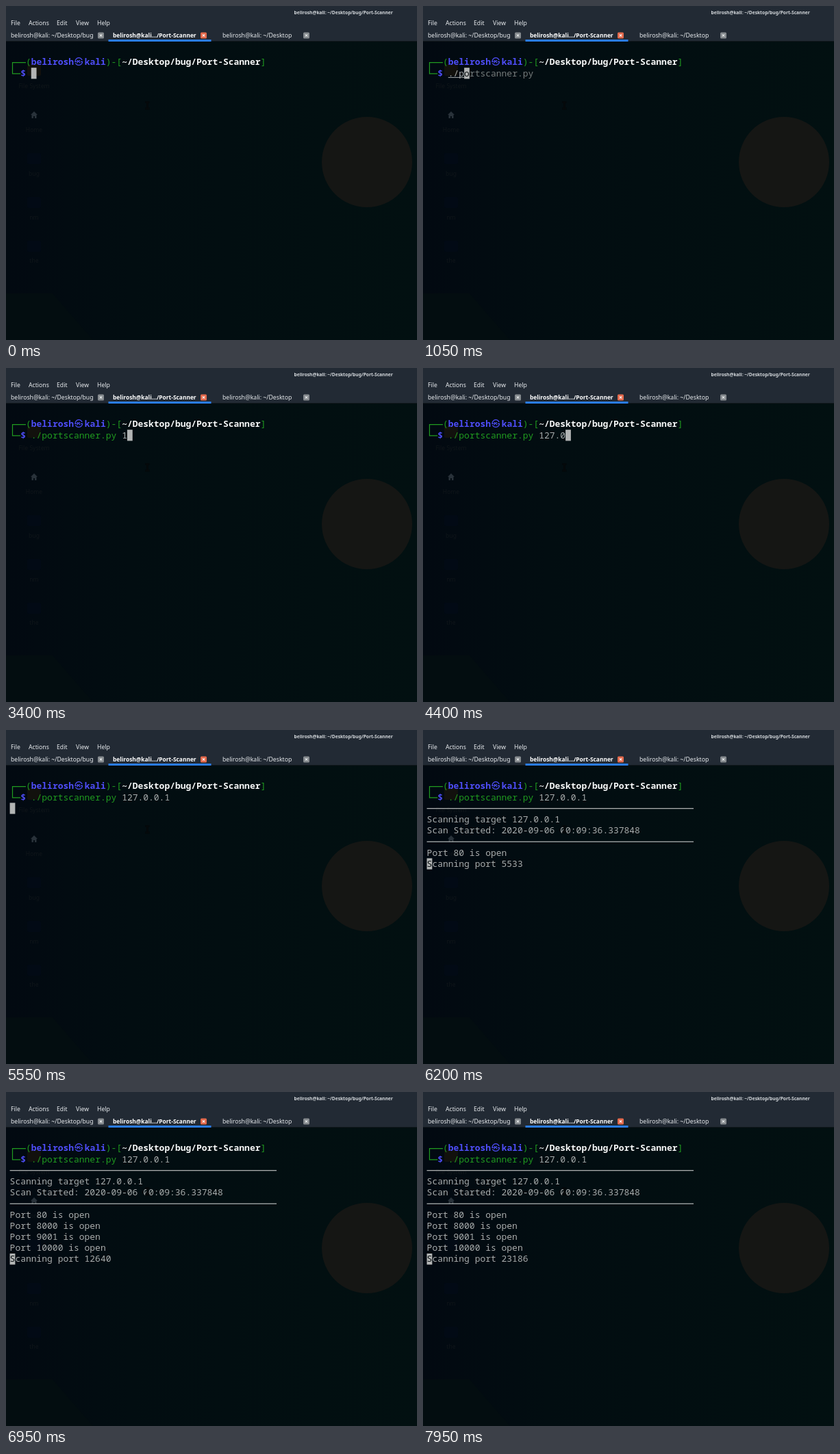
Recreate the animation shown at these times as an HTML page. Size 600 px wide and 488 px high, loop 8 s.

```html
<!DOCTYPE html>
<html lang="en">
<head>
<meta charset="utf-8">
<title>Terminal port scan</title>
<style>
  html, body { margin: 0; width: 100%; height: 100%; overflow: hidden; background: #020d10; }
  svg { display: block; width: 100vw; height: 100vh; }
  text { white-space: pre; }
  .ui { font: 8.7px "Noto Sans", "Open Sans", sans-serif; fill: #e8ebee; }
  .strong { font-weight: 700; }
  .ghost { font: 8.6px "Noto Sans", sans-serif; fill: #10161a; text-anchor: middle; }
  .mono { font: 12.98px "Noto Sans Mono", "DejaVu Sans Mono", monospace; font-variant-ligatures: none; }
  .bold { font-weight: 700; }
</style>
</head>
<body>
<svg viewBox="0 0 600 488" xmlns="http://www.w3.org/2000/svg">
  <defs>
    <linearGradient id="bg">
      <stop offset="0" stop-color="#020911"/>
      <stop offset=".3" stop-color="#020d11"/>
      <stop offset="1" stop-color="#021011"/>
    </linearGradient>
  </defs>
  <rect width="600" height="488" fill="url(#bg)"/>
  <path d="M0 420H68L127 488H0Z" fill="#030d10"/>
  <circle cx="527" cy="228" r="66" fill="#151614"/>
  <g id="desktop">
    <rect x="31" y="85" width="20" height="17" rx="2" fill="#12110d"/>
    <path d="M36 159l5-5 5 5h-1.500v5h-2.500v-3h-2v3h-2.500v-5z" fill="#29323a"/>
  </g>
  <g id="chrome">
    <rect width="600" height="51" fill="#222a34"/>
    <rect y="51" width="600" height="1" fill="#11171c"/>
    <rect x="149.500" y="49" width="150" height="3" fill="#2a7ce8"/>
  </g>
  <g id="screen"></g>
  <g id="pointer" fill="none" stroke-linecap="square">
    <path id="beam" d="M204.500 140.500h1l.8 .8 .8-.8h1M206.300 141.300v8M204.500 150h1l.8-.8 .8 .8h1" stroke="#05090b" stroke-width="2.400"/>
    <use href="#beam" style="stroke:#d0d3d4;stroke-width:1"/>
  </g>
</svg>
<script>
const NS = 'http://www.w3.org/2000/svg';
const $ = id => document.getElementById(id);
const LEFT = 5.6, TOP = 74, CW = 7.788, RH = 16.2;
const GREEN = '#209c20', BLUE = '#4f4efa', WHITE = '#f8f9f9', GREY = '#a9acac', DIM = '#777c7c';
const LOOP = 8000;
const USER = 'belirosh', HOST = USER + '@kali';

function add(parent, tag, attrs, text = '') {
  const el = document.createElementNS(NS, tag);
  for (const key in attrs) el.setAttribute(key, attrs[key]);
  el.textContent = text;
  parent.append(el);
  return el;
}

const colX = col => LEFT + col * CW;
const rowY = row => TOP + row * RH;
const screen = $('screen'), chrome = $('chrome'), desktop = $('desktop');

function write(col, row, text, fill = GREY, bold = false) {
  return add(screen, 'text', {
    x: colX(col), y: rowY(row) + 12.3, class: bold ? 'mono bold' : 'mono', style: `fill:${fill}`
  }, text);
}

// Window title, menu and tabs
function label(x, y, text, cls = '', style = '') {
  add(chrome, 'text', { x, y, class: 'ui ' + cls, style }, text);
}

function closeButton(x, fill, cross) {
  add(chrome, 'rect', { x, y: 38.5, width: 9, height: 9, rx: 1.5, fill });
  add(chrome, 'path', { d: `M${x + 2.8} 41.300l3.400 3.400m0-3.400l-3.400 3.400`, stroke: cross, 'stroke-width': 1.1 });
}

label(492.7, 11.5, HOST + ': ~/Desktop/bug/Port-Scanner', 'strong', 'font-size:6.67px;text-anchor:middle;fill:#d4d8dc');
[[7, 'File'], [33, 'Actions'], [74, 'Edit'], [102, 'View'], [133, 'Help']]
  .forEach(([x, name]) => label(x, 28, name));
label(7, 46, HOST + ': ~/Desktop/bug');
label(156, 46, HOST + '…/Port-Scanner', 'strong', 'font-size:8.4px;fill:#fff');
label(316, 46, HOST + ': ~/Desktop');
closeButton(134, '#858a8e', '#e8eaeb');
closeButton(284, '#e2694c', '#fff');
closeButton(434, '#858a8e', '#e8eaeb');

// Desktop icons showing faintly through the window
for (const y of [215, 279, 343]) add(desktop, 'rect', { x: 31, y, width: 20, height: 16, rx: 2, fill: '#020a15' });
[[120, 'File System'], [184, 'Home'], [248, 'bug'], [312, 'nm'], [375, 'the']]
  .forEach(([y, name]) => add(desktop, 'text', { x: 41, y, class: 'ghost' }, name));

// Prompt
add(screen, 'path', {
  d: `M${colX(3)} 82.700H${colX(.5)}V98.900H${colX(2)}`, fill: 'none', stroke: GREEN, 'stroke-width': 1.2
});
write(3, 0, '(', GREEN);
write(4, 0, USER, BLUE, true);
add(screen, 'text', {
  x: colX(13) - .5, y: rowY(0) + 12.3, 'text-anchor': 'middle',
  style: `font:700 12.500px "Noto Sans CJK KR","Noto Sans CJK JP","Noto Sans CJK SC",sans-serif;fill:${BLUE}`
}, '㉿');
write(14, 0, 'kali', BLUE, true);
write(18, 0, ')-[', GREEN);
write(21, 0, '~/Desktop/bug/Port-Scanner', WHITE, true);
write(47, 0, ']', GREEN);
write(2, 1, '$', BLUE, true);

// Command line
const SCRIPT = './portscanner.py', COMMAND = SCRIPT + ' 127.0.0.1';
const KEYS = [[650, 1], [750, 2], [1050, 3], [1200, 4], [1650, 5], [2050, 17], [3400, 18], [3550, 19],
  [3800, 20], [4200, 21], [4400, 22], [4600, 23], [4800, 24], [4950, 25], [5200, 26]];
const ENTER = 5550;
const command = write(4, 1, ''), hint = write(4, 1, '', DIM), args = write(20, 1, '');
const underline = add(screen, 'rect', { x: colX(4), y: rowY(1) + 13.7, height: 1, width: 0, fill: GREY });

// Scan report
const OPEN = [80, 8000, 9001, 10000];
const rules = [2, 5].map(row => add(screen, 'rect', {
  x: colX(0), y: rowY(row) + 7.6, width: 50 * CW, height: 1.3, fill: GREY
}));
const header = [write(0, 3, 'Scanning target 127.0.0.1'), write(0, 4, 'Scan Started: 2020-09-06 00:09:36.337848')];
const report = [6, 7, 8, 9, 10].map(row => write(0, row, ''));

const cursor = add(screen, 'rect', { width: CW, height: RH, fill: '#b2b4b4' });
const under = write(0, 0, '', '#0b1113');

function moveCursor(col, row, char = '') {
  cursor.setAttribute('x', colX(col));
  cursor.setAttribute('y', rowY(row));
  under.setAttribute('x', colX(col));
  under.setAttribute('y', rowY(row) + 12.3);
  under.textContent = char;
}

// 15 pictures a second, laid on a 50 ms grid
function tick(t) {
  const slot = Math.floor(t / 50);
  return 3 * Math.floor(slot / 4) + [0, 1, 1, 2][slot % 4];
}

function portAt(n) {
  return Math.round(n < 104 ? 5533 + (n - 93) * 7107 / 11 : 12640 + (n - 104) * 10546 / 15);
}

function draw(t) {
  const typed = KEYS.reduce((len, [at, count]) => t >= at ? count : len, 0);
  const guessing = typed > 0 && typed < SCRIPT.length;
  command.textContent = COMMAND.slice(0, Math.min(typed, SCRIPT.length));
  command.style.fill = guessing ? GREY : GREEN;
  hint.textContent = guessing ? ' '.repeat(typed + 1) + SCRIPT.slice(typed + 1) : '';
  args.textContent = COMMAND.slice(SCRIPT.length, Math.max(typed, SCRIPT.length));
  underline.setAttribute('width', guessing ? typed * CW : 0);

  const port = portAt(tick(t));
  const scanning = t >= ENTER && port > 0;
  for (const el of [...rules, ...header]) el.setAttribute('visibility', scanning ? 'visible' : 'hidden');

  const found = scanning ? OPEN.filter(p => p <= port) : [];
  const lines = found.map(p => `Port ${p} is open`);
  if (scanning) lines.push(` canning port ${port}`);
  report.forEach((el, i) => el.textContent = lines[i] || '');

  if (scanning) moveCursor(0, 6 + found.length, 'S');
  else if (t >= ENTER) moveCursor(0, 2);
  else moveCursor(4 + typed, 1, guessing ? SCRIPT[typed] : '');
}

function frame() {
  draw(performance.now() % LOOP);
  requestAnimationFrame(frame);
}
frame();
</script>
</body>
</html>
```
